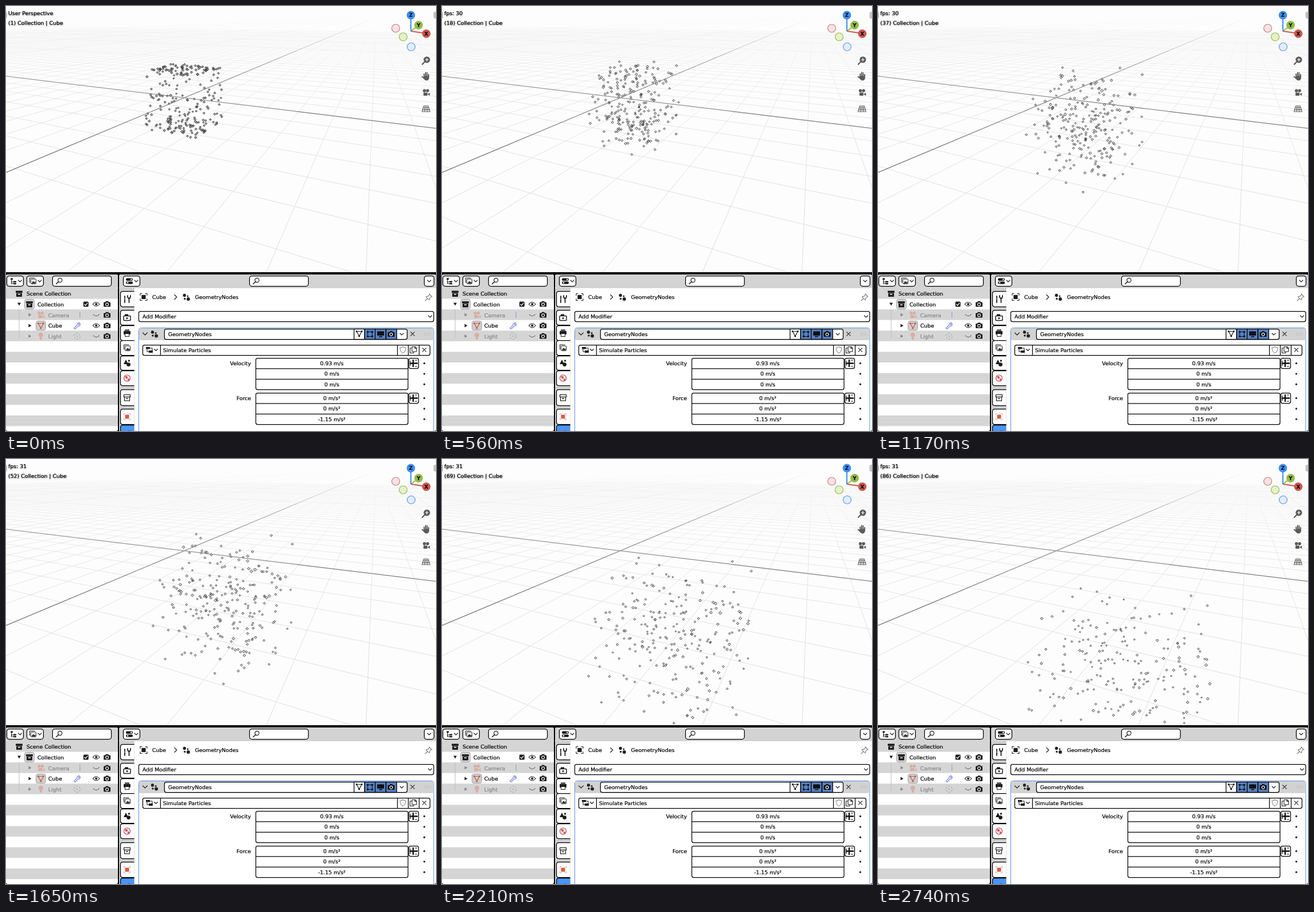
An HTML page that plays this animation: 753 by 744 pixels, repeating every 2.78 s.

```html
<!DOCTYPE html>
<html lang="en">
<head>
<meta charset="utf-8">
<title>Particle simulation</title>
<style>
html, body { margin: 0; width: 100%; height: 100%; overflow: hidden; background: #000; }
svg { display: block; width: 753px; height: 744px; }
text { font: 9.4px "DejaVu Sans", sans-serif; fill: #000; stroke: #000; stroke-width: .22px; white-space: pre; }
.dim { fill: #858585; stroke: #858585; }
.shade { filter: drop-shadow(0 1px 1.2px rgba(0,0,0,.4)); }
.box { fill: #fff; stroke: #000; stroke-width: 1.25; }
.on { fill: #5680c2; stroke: #000; stroke-width: 1.25; }
.ln { fill: none; stroke: #1c1c1c; stroke-width: 1.1; stroke-linecap: round; stroke-linejoin: round; }
</style>
</head>
<body>
<svg id="stage" viewBox="0 0 753 744" xmlns="http://www.w3.org/2000/svg">
  <defs>
    <clipPath id="view"><rect width="753" height="466"/></clipPath>
    <linearGradient id="fine" gradientUnits="userSpaceOnUse" x1="0" y1="20" x2="0" y2="466">
      <stop offset=".04" stop-color="#dedede" stop-opacity="0"/>
      <stop offset=".15" stop-color="#dedede" stop-opacity=".28"/>
      <stop offset=".35" stop-color="#dedede" stop-opacity=".75"/>
      <stop offset=".7" stop-color="#dedede"/>
    </linearGradient>
    <linearGradient id="coarse" gradientUnits="userSpaceOnUse" x1="0" y1="20" x2="0" y2="466">
      <stop offset="0" stop-color="#dadada" stop-opacity="0"/>
      <stop offset=".12" stop-color="#dadada" stop-opacity=".4"/>
      <stop offset=".5" stop-color="#dadada"/>
    </linearGradient>
    <linearGradient id="axis" gradientUnits="userSpaceOnUse" x1="0" y1="20" x2="0" y2="290">
      <stop offset="0" stop-color="#707070" stop-opacity="0"/>
      <stop offset=".15" stop-color="#707070" stop-opacity=".25"/>
      <stop offset=".38" stop-color="#707070" stop-opacity=".68"/>
      <stop offset=".7" stop-color="#707070" stop-opacity=".88"/>
      <stop offset="1" stop-color="#666"/>
    </linearGradient>
  </defs>
  <g clip-path="url(#view)">
    <rect width="753" height="466" fill="#fdfdfd"/>
    <path id="grid1" fill="none" stroke="url(#fine)"/>
    <path id="grid10" fill="none" stroke="url(#coarse)"/>
    <path id="axes" fill="none" stroke="url(#axis)" stroke-width="1.3"/>
    <path id="dots" stroke="#333" stroke-width=".9" stroke-linejoin="round"/>
    <g class="shade"><text id="head" x="4" y="16"></text><text id="count" x="4" y="32.5"></text></g>
    <g id="gizmo"></g>
  </g>
  <g id="ui"></g>
</svg>
<script>
const $ = id => document.getElementById(id);

// ---- camera ----
const F = 536, DEPTH = 10.76, CX = 376, CY = 233;
const YAW = Math.atan(0.4715), PITCH = Math.atan(0.3974);
const [sy, cy, sp, cp] = [Math.sin(YAW), Math.cos(YAW), Math.sin(PITCH), Math.cos(PITCH)];
const SHIFT_X = (312 - CX) * DEPTH / F, SHIFT_Y = (CY - 160.7) * DEPTH / F;

function project(x, y, z) {
  const side = x * cy + y * sy, ahead = y * cy - x * sy;
  const d = DEPTH + ahead * cp - z * sp;
  return [CX + F * (side + SHIFT_X) / d, CY - F * (ahead * sp + z * cp + SHIFT_Y) / d, d];
}

// ---- ground grid ----
const pt = (x, y) => project(x, y, 0).slice(0, 2).map(v => v.toFixed(1)).join(' ');
const alongY = x => `M${pt(x, (x * sy - 10) / cy)}L${pt(x, 900)}`;
const alongX = y => `M${pt((y * cy + 10) / sy, y)}L${pt(-900, y)}`;
let fine = '', coarse = '';
for (let i = -60; i <= 60; i++) {
  if (!i) continue;
  if (i % 10) fine += alongY(i) + alongX(i);
  else coarse += alongY(i) + alongX(i);
}
$('grid1').setAttribute('d', fine);
$('grid10').setAttribute('d', coarse);
$('axes').setAttribute('d', alongY(0) + alongX(0));

// ---- particles: start on a cube, mostly its top and base, drifting slightly inwards ----
let seed = 20477;
function rand() {
  seed = (seed + 0x6D2B79F5) | 0;
  let r = Math.imul(seed ^ (seed >>> 15), 1 | seed);
  r = (r + Math.imul(r ^ (r >>> 7), 61 | r)) ^ r;
  return ((r ^ (r >>> 14)) >>> 0) / 4294967296;
}
const spread = () => rand() * 2 - 1;
const WIND = 0.93, GRAVITY = -1.15, INWARD = 0.25;
const particles = Array.from({ length: 250 }, (_, i) => {
  const pos = [spread(), spread(), spread()];
  pos[Math.min(i % 4, 2)] = i % 8 < 4 ? 1 : -1;
  const vel = pos.map(p => spread() - INWARD * p);
  return { pos, vel, size: 0.033 + 0.011 * rand() };
});

function cloud(s) {
  let d = '';
  for (const { pos, vel, size } of particles) {
    const [x, y, depth] = project(
      pos[0] + (vel[0] + WIND) * s,
      pos[1] + vel[1] * s,
      pos[2] + vel[2] * s + GRAVITY * s * s / 2);
    if (y > 470) continue;
    const r = (F * size / depth).toFixed(2);
    d += `M${x.toFixed(1)} ${(y - r).toFixed(1)}l${r} ${r}l-${r} ${r}l-${r}-${r}z`;
  }
  return d;
}

// ---- drawing helpers ----
const rect = (x, y, w, h, r = 0, more = 'class="box"') =>
  `<rect x="${x}" y="${y}" width="${w}" height="${h}" rx="${r}" ${more}/>`;
const flat = (x, y, w, h, c, r = 0) => rect(x, y, w, h, r, `fill="${c}"`);
const disc = (x, y, r, c, more = '') => `<circle cx="${x}" cy="${y}" r="${r}" fill="${c}" ${more}/>`;
const line = (d, more = '') => `<path class="ln" d="${d}" ${more}/>`;
const shape = (d, c = '#1c1c1c') => `<path d="${d}" fill="${c}"/>`;
const label = (x, y, s, more = '') => `<text x="${x}" y="${y}" ${more}>${s}</text>`;
const at = (x, y, s) => `<g transform="translate(${x} ${y})">${s}</g>`;
const chevron = (x, y) => line(`M${x - 3} ${y - 1.5}l3 3l3-3`);
const cross = (x, y) => line(`M${x - 3.2} ${y - 3.2}l6.4 6.4m0-6.4l-6.4 6.4`);
const mag = (x, y) => line(`M${x - 1} ${y + 1}l-4 4`, 'style="stroke-width:1.6"') +
  disc(x + 1.5, y - 1.5, 3.6, 'none', 'stroke="#1c1c1c" stroke-width="1.2"');
const camera = (x, y, c = '#1c1c1c') => at(x, y,
  flat(-6, -3.6, 12, 8.2, c, 1) + flat(-2.6, -5.3, 5.2, 3, c, 1) +
  disc(0, .4, 2.5, c, 'stroke="#fff" stroke-width="1.2"'));
const movie = (x, y, c) => at(x, y, disc(-2.8, -3.2, 2.7, c) + disc(2.7, -3.2, 2.7, c) +
  flat(-4.5, 0, 7, 5.6, c, 1) + shape('M3.2 2.2l3.6-2v5.4l-3.6-2z', c));
const eye = (x, y) => line(`M${x - 6} ${y}q6-7 12 0q-6 7-12 0z`) + disc(x, y, 2, '#1c1c1c');
const shut = (x, y) => line(`M${x - 5} ${y - 1}q5 5.5 10 0`, 'stroke-opacity=".75"');
const nodes = (x, y) => at(x, y, disc(-3.5, -3, 2.7, '#222') + disc(2.2, -1.6, 1.5, '#222') +
  disc(-3, 3, 1.7, '#222') + disc(3.2, 3.4, 3, '#222'));
const archive = (x, y) => at(x, y, flat(-6, -5, 12, 3.4, '#1c1c1c', .6) +
  flat(-5, -1, 10, 6.4, '#1c1c1c', .6) + flat(-2, .4, 4, 1.6, '#fff'));
const pictures = (x, y) => at(x, y, line('M-5.5 2.5v-8h8.5') +
  rect(-3.5, -3.5, 9, 8.5, 1, 'fill="#fff" stroke="#1c1c1c"') + shape('M-2.5 4l3-4l2 2l1-1.2l1.6 3.2z'));
const tri = (x, y, c) => `<path d="M${x - 4.5} ${y - 4}h9l-4.5 8.5z" fill="none" stroke="${c}" stroke-width="1.2"/>` +
  [[-4.5, -4], [4.5, -4], [0, 4.5]].map(p => disc(x + p[0], y + p[1], 1.6, c)).join('');
const fold = (x, y, open, c = '#1c1c1c') =>
  shape(open ? `M${x - 3} ${y - 2.5}h6l-3 5z` : `M${x - 2} ${y - 3}l5 3l-5 3z`, c);
const tree = (x, y) => at(x, y, flat(-5, -5, 4, 2.6, '#1c1c1c') + line('M-3.5-2v6.5h3.5m-3.5-3h3.5') +
  flat(0, 0, 5, 2.4, '#1c1c1c') + flat(0, 3.4, 5, 2.4, '#1c1c1c'));
const wrench = (x, y, c) => line(`M${x - 5} ${y + 4.5}l5.5-5.5q-.8-4.4 4.5-4l-2.4 2.6l1 1.2l2.4-2.2q.6 5-3.8 4.4l-5.2 5.2z`, `style="stroke:${c}"`);

// ---- viewport widgets ----
function gizmo() {
  const red = '#c9584f', green = '#92bb45', blue = '#3f8ff2', g = '#5a5a5a';
  const arm = (x, y, c) => `<path d="M709 44L${x} ${y}" stroke="${c}" stroke-width="2"/>`;
  const ring = (x, y, c, f) => disc(x, y, 7, f, `stroke="${c}" stroke-width="1.2"`);
  const tip = (x, y, c, s) => disc(x, y, 7.4, c) +
    label(x, y + 3.3, s, 'text-anchor="middle" style="font-weight:bold;font-size:9px;stroke:none"');
  return ring(682.5, 39, '#cf7a80', '#f5e2e3') + ring(709.5, 71.5, '#5a9bee', '#e3edfb') +
    arm(722, 34, green) + tip(722.5, 33.5, green, 'Y') + arm(709, 16, blue) + arm(736, 48, red) +
    ring(695.5, 54, '#93bd48', '#e6f2cd') + tip(709, 16, blue, 'Z') + tip(736, 48.5, red, 'X') +
    flat(-3, 10, 5, 12, '#c4c4c4', 3) + flat(748.5, 10, 9, 12, '#c4c4c4', 3) +
    disc(737, 94, 5.6, g) + `<path d="M733 98l-4 4" stroke="${g}" stroke-width="2.2" stroke-linecap="round"/>` +
    '<path d="M734 94h6m-3-3v6" stroke="#fff" stroke-width="1.2"/>' +
    at(735.5, 123.5, `<path d="M-3.2 1v-5.5M-.6 0v-7M2 0v-6.5M4.6 1v-4.5M-3.5 3l-3.3-3" stroke="${g}" stroke-width="1.9" stroke-linecap="round"/>` +
      shape('M-4.2-1h9.7v3q-.5 5-4.7 5q-3 0-5-4z', g)) +
    movie(735.5, 151.5, g) +
    at(735.5, 180, `<path d="M-4-5h8l3 10h-14zM-5-1.8h10M-6 1.6h12M-1.4-5l-1 10M1.4-5l1 10" fill="none" stroke="${g}" stroke-width="1.1"/>`);
}

// ---- outliner ----
function outliner() {
  let s = flat(0, 470, 196, 274, '#fff', 3) + flat(0, 470, 196, 24, '#d3d3d3', 3);
  for (let k = 0; k < 14; k += 2) s += flat(0, 494 + 18.57 * k, 196, 18.57, '#d5d5d5');
  s += rect(1.5, 472.5, 29, 18, 4) + tree(13, 481.5) + chevron(24.5, 481.5) +
    rect(36.5, 472.5, 29, 18, 4) + pictures(47, 481.5) + chevron(59, 481.5) +
    rect(81.5, 472.5, 103, 18, 4) + mag(93, 481.5);
  s += archive(23, 503.5) + label(36, 507, 'Scene Collection');
  s += fold(23, 522, true) + rect(32.5, 513.5, 17, 17, 3, 'fill="#d2d2d2" stroke="#a8a8a8"') + archive(41, 522) +
    label(55, 526, 'Collection') + rect(135.5, 517.5, 9, 9, 1.5, 'fill="#1c1c1c"') +
    '<path d="M137.3 522l2 2.3l3.6-4.6" fill="none" stroke="#fff" stroke-width="1.3"/>' +
    eye(158, 522) + camera(177, 522);
  s += '<path d="M23 531v50" stroke="#bbb"/>';
  s += fold(41.5, 540.5, false, '#888') + movie(61, 541, '#d9aea2') + label(74, 544.5, 'Camera', 'class="dim"') +
    '<path d="M129.5 535v11" stroke="#8a9ac8"/>' + shut(158, 541) + camera(177, 541);
  s += fold(41.5, 559.5, false) + rect(52.5, 551.5, 17, 16, 3, 'fill="#d2cdcb" stroke="#a8a8a8"') + tri(61, 559.5, '#b8604a') +
    label(74, 563, 'Cube') + wrench(124, 559.5, '#7b86d2') + eye(158, 559.5) + camera(177, 559.5);
  s += fold(41.5, 578, false, '#888') + disc(61, 576, 4, '#d9aea2') + flat(59, 580, 4, 4, '#d9aea2', 1) +
    label(74, 582, 'Light', 'class="dim"') +
    disc(124.5, 578, 5.4, 'none', 'stroke="#a5aaa5" stroke-dasharray="4 1.6"') + disc(124.5, 578, 1, '#999') +
    shut(158, 578) + camera(177, 578);
  return s;
}

// ---- properties editor ----
function tabs() {
  const tab = (y, h, icon, c = '#fff') =>
    `<path d="M224.5 ${y}h-20q-4 0-4 4v${h - 8}q0 4 4 4h20" fill="${c}" stroke="#000" stroke-width="1.25"/>` +
    at(212, y + h / 2, icon);
  return flat(198, 494, 27, 250, '#cfcfcf') +
    tab(499.5, 27, line('M-4-5v4m0 2v5M3.5 6v-7M1-6q0 5 2.5 5t2.5-5', 'style="stroke-width:1.8"')) +
    tab(532.5, 26, rect(-6, -3, 12, 8, 1, 'fill="none" stroke="#1c1c1c" stroke-width="1.5"') + flat(-4, -6, 6, 2.6, '#1c1c1c') + disc(0, 1, 1.5, '#1c1c1c')) +
    tab(559.5, 26, flat(-6, -3.5, 12, 6, '#1c1c1c', 1) + flat(-4, -6, 8, 2, '#1c1c1c') + rect(-3.5, 1, 7, 5, 0, 'fill="#fff" stroke="#1c1c1c"')) +
    tab(585.5, 26, pictures(0, 0)) +
    tab(612.5, 25, shape('M-2-6l4 8h-8z') + disc(2.6, 2.6, 3.4, '#1c1c1c') + disc(3.5, -4, 1.7, '#1c1c1c')) +
    tab(638.5, 26, disc(0, 0, 5.6, '#fbe9ea', 'stroke="#c95a62" stroke-width="1.3"') + shape('M-4-3q4-2 5 1t-3 3zM1 1q4-1 3 2t-3 1z', '#c95a62')) +
    tab(671.5, 28, rect(-5.5, -5, 11, 4, 0, 'fill="#fff" stroke="#1c1c1c" stroke-width="1.2"') + rect(-4.5, -1, 9, 6.5, 0, 'fill="#fff" stroke="#1c1c1c" stroke-width="1.2"') + flat(-2, 1, 4, 1.4, '#1c1c1c')) +
    tab(705.5, 27, rect(-5.5, -5.5, 11, 11, 0, 'fill="none" stroke="#e3a79b" stroke-dasharray="3 5 3 0"') + flat(-3.5, -3.5, 7, 7, '#d0604c')) +
    tab(733.5, 30, wrench(0, 0, '#2a5aa8'), '#4a95fb');
}

function fields(y, name, values) {
  let s = label(429, y + 12.2, name, 'text-anchor="end"') + rect(437.5, y, 266.5, 55, 3);
  values.forEach((v, i) => {
    const top = y + i * 18.4;
    if (i) s += `<path d="M437.5 ${top}h266.5" stroke="#000" stroke-width="1.25"/>`;
    s += label(570.5, top + 12.2, v, 'text-anchor="middle"') + disc(732.5, top + 9, 1.7, '#2a2a2a');
  });
  return s + rect(705.5, y, 17, 18, 3) +
    at(713, y + 9, '<path d="M-6 0h14M0-6.500v13" stroke="#111" stroke-width="2.4"/>' +
      '<path d="M-5-4.500v9M3-5.500h4M3 5.500h4" stroke="#111" stroke-width="1.2"/>');
}

function properties() {
  let s = flat(198, 470, 555, 274, '#fff', 3) + flat(198, 470, 555, 24, '#d3d3d3', 3) + tabs();
  s += rect(205.5, 472.5, 29, 18, 4) +
    at(216, 481.5, flat(-6, -5, 12, 4.4, '#1c1c1c', 2) + disc(3.3, -2.8, 1.3, '#fff') + flat(-6, .8, 12, 4.4, '#1c1c1c', 2) + disc(-3, 3, 1.3, '#fff')) +
    chevron(228, 481.5) + rect(426.5, 472.5, 103, 18, 4) + mag(438, 481.5) + rect(732.5, 472.5, 17, 18, 4) + chevron(741, 481.5);
  s += at(241, 509.5, line('M-6-3v-3h3M3-6h3v3M6 3v3h-3M-3 6h-3v-3') + flat(-3.6, -3.6, 7.2, 7.2, '#1c1c1c')) +
    label(256, 513, 'Cube') + line('M295 505.5l4 4l-4 4') + nodes(316, 509.5) + label(331, 513, 'GeometryNodes') +
    line('M741 504l5 5M742 505l-3.5 3.5q-2-.5-3 .8l5.6 5.4q1.4-1 .6-3l3.4-3.4M738 512l-4 4', 'style="stroke:#808080"');
  s += rect(232.5, 534.5, 516.5, 18, 3) + label(239, 546.6, 'Add Modifier') + chevron(742.5, 543.5);
  s += rect(232.5, 563.5, 516.5, 200, 4, 'fill="#fff" stroke="#5a8fe0"') + flat(233, 564, 515.5, 21, '#d2d2d2', 3);
  s += line('M239.5 572l4 4l4-4') + nodes(260, 574) + rect(277.5, 565.5, 425, 18, 3) + label(284, 577.5, 'GeometryNodes');
  s += rect(609.5, 565.5, 18.5, 18) + tri(618.5, 573.5, '#1c1c1c') +
    [628, 646.5, 665.5].map(x => rect(x, 565.5, 18.7, 18, 0, 'class="on"')).join('') +
    at(637.3, 574.5, rect(-4, -4, 8, 8, 0, 'fill="none" stroke="#111"') +
      [[-4, -4], [4, -4], [-4, 4], [4, 4]].map(p => flat(p[0] - 1.5, p[1] - 1.5, 3, 3, '#111')).join('')) +
    at(656, 574, flat(-6, -4.5, 12, 7.5, '#111', 1) + flat(-3, 4, 6, 1.6, '#111')) +
    camera(674.5, 574.5, '#111') + chevron(693, 574.5) + cross(712, 574);
  for (let i = 0; i < 8; i++) s += flat(733 + (i % 4) * 3, 572 + (i >> 2) * 3, 1.3, 1.3, '#b4b4b4');
  s += rect(239.5, 593.5, 503, 18, 3) +
    at(251, 602, flat(-6, -5, 7, 3.5, '#1c1c1c') + flat(-1, 1, 7, 4, '#1c1c1c') + line('M-4-1v4h3M1-3h4v4')) +
    chevron(262.5, 602) + label(275, 605.5, 'Simulate Particles') +
    '<path d="M270.5 593.5v18M685.5 593.5v18M704.5 593.5v18M723.5 593.5v18" stroke="#000" stroke-width="1.25"/>' +
    line('M695 596.5q2.5 1.8 5 1.8q.2 6.5-5 9.5q-5.2-3-5-9.5q2.5 0 5-1.8z', 'style="stroke:#8c8c8c"') +
    line('M710 599h-2.5v8.5h6.5v-2') + line('M711 596.5h5.5l2.5 2.5v6h-8zM716 596.5v3h3') + cross(732.5, 602);
  return s + fields(616.5, 'Velocity', ['0.93 m/s', '0 m/s', '0 m/s']) +
    fields(677.5, 'Force', ['0 m/s²', '0 m/s²', '-1.15 m/s²']);
}

$('gizmo').innerHTML = gizmo();
$('ui').innerHTML = flat(0, 466, 753, 278, '#000') + outliner() + properties();

// ---- playback: start, end and step of each run of simulation ticks ----
const LOOP = 2780;
const runs = [[0, 0, 40], [40, 560, 40], [600, 1080, 40], [1170, 1690, 40], [1730, 2250, 40], [2290, 2740, 40.9]];

function snap(t) {
  const [from, to, step] = runs.filter(r => r[0] <= t).pop();
  return Math.min(to, from + Math.floor((t - from) / step) * step);
}

let shown = -1;
function render(ms) {
  const t = snap(ms % LOOP);
  if (t === shown) return;
  shown = t;
  const tick = Math.floor(t * 0.0311);
  const slow = t < 600 || (t >= 1170 && t < 1600);
  $('head').textContent = tick ? `fps: ${slow ? 30 : 31}` : 'User Perspective';
  $('count').textContent = `(${tick + 1}) Collection | Cube`;
  $('dots').setAttribute('d', cloud(tick / 30));
  $('dots').setAttribute('fill', tick ? '#dcdcdc' : '#a6a6a6');
}

const start = performance.now();
function loop() {
  render(performance.now() - start);
  requestAnimationFrame(loop);
}
render(0);
requestAnimationFrame(loop);
</script>
</body>
</html>
```
